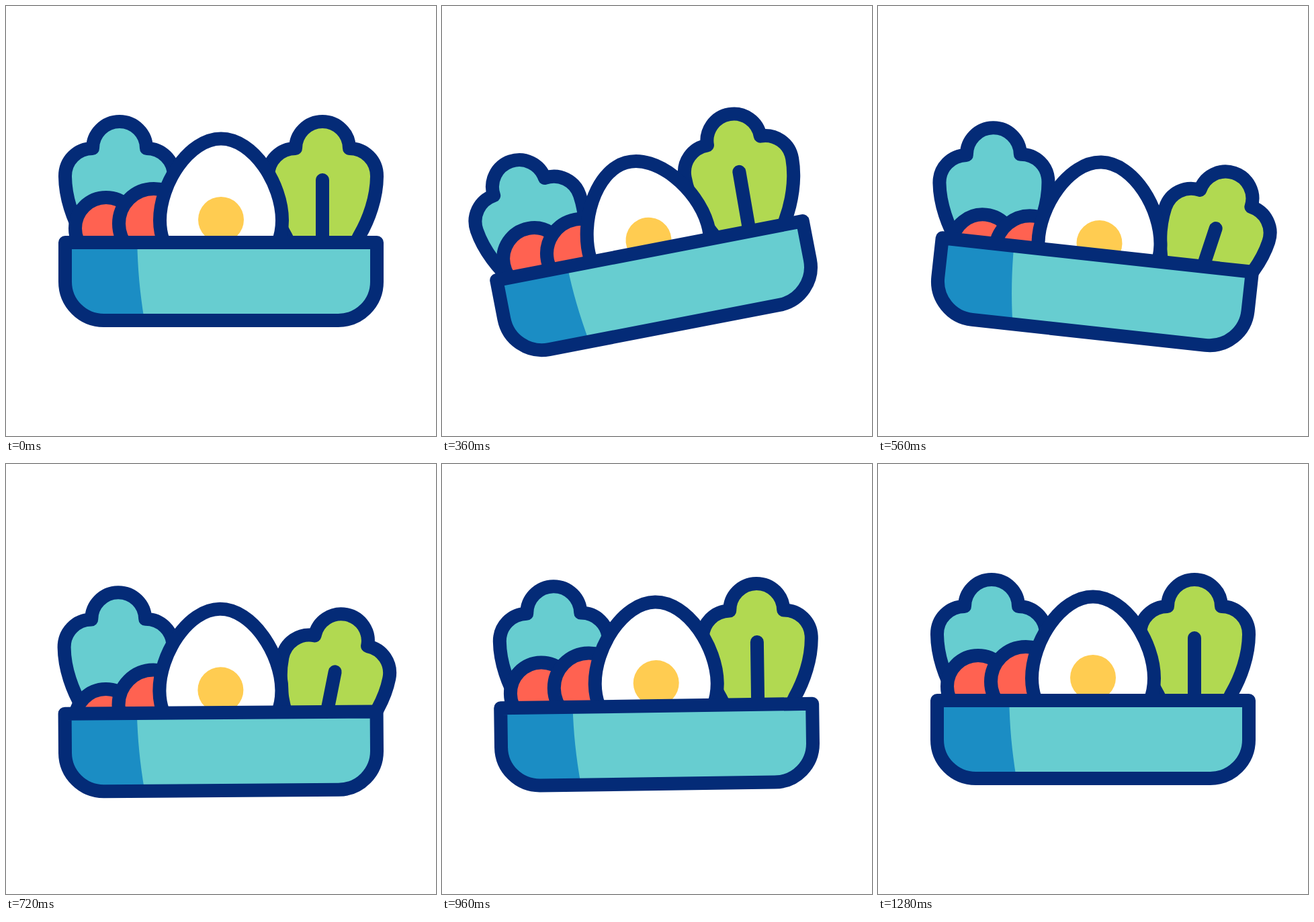
An HTML page for the animation above (1.32 s loop, 640x640 px).

```html
<!DOCTYPE html>
<html lang="en">
<head>
<meta charset="utf-8">
<title>Salad bowl</title>
<style>
  html, body { margin: 0; width: 100%; height: 100%; overflow: hidden; background: #fff; }
  svg { display: block; width: 100%; height: 100%; }
  .line { stroke: #042b77; stroke-width: 20; stroke-linecap: round; stroke-linejoin: round; }
</style>
</head>
<body>
<svg viewBox="0 0 640 640" xmlns="http://www.w3.org/2000/svg">
  <defs>
    <!-- leaf outline, centred on x = 0 -->
    <path id="leaf" d="M-40 212A40 40 0 0 1 40 212C63 212 81 230 81 253C81 285 69 318 55 342L34 385H-34L-55 342C-69 318 -81 285 -81 253C-81 230 -63 212 -40 212Z"/>
  </defs>
  <g id="all">
    <g id="leftLeaf"><use href="#leaf" x="169" class="line" fill="#67cdd0"/></g>
    <g id="rightLeaf">
      <use href="#leaf" x="471" class="line" fill="#b1d951"/>
      <path class="line" d="M471 259V380"/>
    </g>
    <circle id="tomatoA" class="line" cx="149" cy="331" r="46" fill="#ff6251"/>
    <circle id="tomatoB" class="line" cx="220" cy="324" r="52" fill="#ff6251"/>
    <g id="egg">
      <path class="line" fill="#fff" d="M320 197.5C368 197.5 411 265 411 319C411 370 370 409 320 409C270 409 229 370 229 319C229 265 272 197.5 320 197.5Z"/>
      <circle cx="320" cy="318" r="34" fill="#ffcc51"/>
    </g>
    <path fill="#67cdd0" d="M88 352H552V410.5A57.5 57.5 0 0 1 494.5 468H145.5A57.5 57.5 0 0 1 88 410.5Z"/>
    <path fill="#1b8dc4" d="M88 352H195.3C196 390 199 425 206 468H145.5A57.5 57.5 0 0 1 88 410.5Z"/>
    <path class="line" fill="none" d="M88 352H552V410.5A57.5 57.5 0 0 1 494.5 468H145.5A57.5 57.5 0 0 1 88 410.5Z"/>
  </g>
</svg>
<script>
const LOOP = 1320, STEP = 40;

// Each track is a list of [time in ms, value].
const tracks = {
  tilt: [[70, 0], [240, -6.9], [355, -11], [440, -2], [525, 7], [560, 6.25],
         [600, 5.2], [720, -0.4], [830, -4], [960, -0.8], [1160, 0]],
  drop: [[70, 0], [240, 4], [440, 15.2], [640, 19], [1220, 0]],
  egg: [[100, 0], [460, 23], [740, 0]],
  eggTilt: [[100, 0], [460, -6.8], [740, 0]],
  leftLeaf: [[100, 0], [460, -10], [740, 0]],
  tomatoB: [[220, 0], [540, 33], [890, 0]],
  tomatoA: [[345, 0], [665, 34], [960, 0]],
  rightLeaf: [[300, 0], [640, 14], [950, 0]]
};

const secant = (k, i) => (k[i + 1][1] - k[i][1]) / (k[i + 1][0] - k[i][0]);

// Flat at both ends and at every turning point.
function slope(k, i) {
  if (i === 0 || i === k.length - 1) return 0;
  const a = secant(k, i - 1), b = secant(k, i);
  return a * b <= 0 ? 0 : 2 * a * b / (a + b);
}

function valueAt(name, t) {
  const k = tracks[name], last = k.length - 1;
  if (t <= k[0][0]) return k[0][1];
  if (t >= k[last][0]) return k[last][1];
  let i = 0;
  while (t >= k[i + 1][0]) i++;
  const d = k[i + 1][0] - k[i][0], p = (t - k[i][0]) / d, q = 1 - p;
  return k[i][1] * q * q * (1 + 2 * p) + k[i + 1][1] * p * p * (3 - 2 * p)
    + d * p * q * (slope(k, i) * q - slope(k, i + 1) * p);
}

const place = (id, transform) =>
  document.getElementById(id).setAttribute("transform", transform);

function draw(t) {
  const v = name => valueAt(name, t).toFixed(3);
  place("all", `translate(0 ${v("drop")}) rotate(${v("tilt")} 320 410)`);
  place("leftLeaf", `rotate(${v("leftLeaf")} 228 368)`);
  place("rightLeaf", `rotate(${v("rightLeaf")} 317 371)`);
  place("egg", `translate(0 ${v("egg")}) rotate(${v("eggTilt")} 320 303)`);
  for (const id of ["tomatoA", "tomatoB"]) place(id, `translate(0 ${v(id)})`);
}

const start = performance.now();

function tick() {
  const t = (performance.now() - start) % LOOP;
  draw(Math.floor(t / STEP) * STEP);
  requestAnimationFrame(tick);
}
tick();
</script>
</body>
</html>
```
